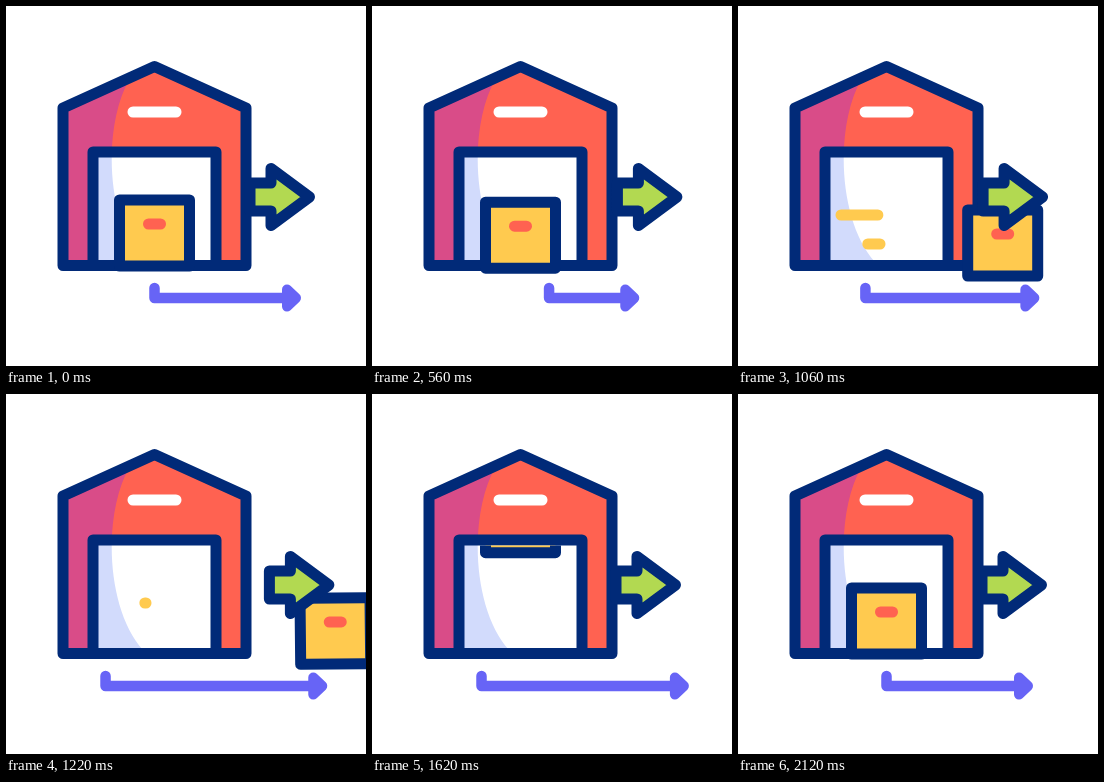
These frames come from a looping animation (360 px wide and 360 px high, 2.66 s). An HTML page with a canvas:

```html
<!DOCTYPE html>
<html lang="en">
<head>
<meta charset="utf-8">
<title>Shipping out</title>
<style>
html, body { margin: 0; width: 100%; height: 100%; overflow: hidden; background: #fff; }
canvas { display: block; width: 100vmin; height: 100vmin; }
</style>
</head>
<body>
<canvas id="stage" width="360" height="360"></canvas>
<script>
const LOOP = 2660;
const NAVY = '#012a78', RED = '#ff6251', PINK = '#d94c88', LAVENDER = '#d2dbfc';
const YELLOW = '#ffca4f', GREEN = '#b2d951', VIOLET = '#6764f6';
const c = document.getElementById('stage').getContext('2d');

const ramp = (t, a, b) => Math.min(1, Math.max(0, (t - a) / (b - a)));
const smooth = (t, a, b) => { const u = ramp(t, a, b); return u * u * (3 - 2 * u); };

function shape(points, fill, stroke, width = 11, closed = true) {
  const path = new Path2D();
  points.forEach(([x, y]) => path.lineTo(x, y));
  if (closed) path.closePath();
  if (fill) { c.fillStyle = fill; c.fill(path); }
  if (stroke) { c.strokeStyle = stroke; c.lineWidth = width; c.stroke(path); }
  return path;
}

const line = (points, color, width) => shape(points, null, color, width, false);

// A stroke that grows from its start, then is erased from its start.
function dash(x1, y1, x2, y2, head, tail) {
  if (head <= tail) return;
  const at = u => [x1 + (x2 - x1) * u, y1 + (y2 - y1) * u];
  line([at(tail), at(head)], YELLOW, 11);
}

function shade(path, color) {
  c.save();
  c.clip(path);
  c.beginPath();
  c.moveTo(40, 50);
  c.lineTo(133, 50);
  c.lineTo(124, 72);
  c.bezierCurveTo(96, 120, 100, 215, 137, 256);
  c.lineTo(40, 270);
  c.fillStyle = color;
  c.fill();
  c.restore();
}

function warehouse() {
  const wall = [[57, 259.5], [57, 102], [148.5, 60.5], [240, 102], [240, 259.5]];
  const door = [[87, 259.5], [87, 146], [210, 146], [210, 259.5]];
  shade(shape(wall, RED), PINK);
  shade(shape(door, '#fff'), LAVENDER);
  shape(door, null, NAVY);
  shape(wall, null, NAVY);
  line([[127, 106], [170, 106]], '#fff');
}

function crate(t) {
  let x = 0, y = 0, tilt = 0;
  const falling = t > 1560 && t < 1700;
  if (t < 1500) {
    const u = Math.max(0, t - 685);
    x = u < 175 ? 0.4 * u * u / 350 : 35 + 0.404 * (u - 175);
    y = 10 * smooth(t, 510, 680);
    tilt = -0.1 * ramp(t, 1200, 1400);
  } else if (t <= 1560) {
    return;
  } else if (falling) {
    y = -125 * (1 - ramp(t, 1560, 1700) ** 2);
  } else {
    y = -10 * Math.sin(Math.PI * ramp(t, 1700, 1900));
  }
  c.save();
  if (falling) {
    c.beginPath();
    c.rect(92, 151.5, 113, 114);
    c.clip();
  }
  c.translate(148.5 + x, 227 + y);
  c.rotate(tilt);
  shape([[-35, -33], [35, -33], [35, 33], [-35, 33]], YELLOW, NAVY);
  line([[-6, -9], [6, -9]], RED);
  c.restore();
}

function speedLines(t) {
  const grow = 1 - (1 - ramp(t, 780, 1080)) ** 2;
  dash(103, 209, 140, 209, grow, smooth(t, 1060, 1240));
  dash(83, 238, 142, 238, smooth(t, 720, 920), smooth(t, 870, 1140));
}

function sparks(t) {
  const head = ramp(t, 1700, 1840), tail = ramp(t, 1780, 1920);
  dash(127, 261, 121, 267, head, tail);
  dash(151, 258.5, 154, 283, head, tail);
  dash(176, 258, 181, 265, head, tail);
}

function greenArrow(t) {
  const x = 22 * Math.sin(2 * Math.PI * ramp(t, 520, 1530)) ** 2;
  const points = [[244, 177], [265, 177], [265, 162.5], [303.5, 191],
                  [265, 219.5], [265, 205], [244, 205]];
  shape(points.map(([px, py]) => [px + x, py]), GREEN, NAVY);
}

function baseArrow(t) {
  const shrink = smooth(t, 180, 690), stretch = smooth(t, 690, 1340), rest = smooth(t, 1340, 2090);
  const left = 148.5 + 34 * shrink - 91 * stretch + 57 * rest;
  const right = 290 - 33 * shrink + 65 * stretch - 32 * rest;
  line([[left, 282], [left, 292], [right - 5, 292]], VIOLET, 10.5);
  shape([[right - 9, 283.5], [right, 292], [right - 9, 300.5]], VIOLET, VIOLET, 10);
}

function draw(now) {
  const t = now % LOOP;
  c.fillStyle = '#fff';
  c.fillRect(0, 0, 360, 360);
  c.lineJoin = c.lineCap = 'round';
  warehouse();
  speedLines(t);
  crate(t);
  greenArrow(t);
  baseArrow(t);
  sparks(t);
}

const start = performance.now();
function tick() {
  draw(performance.now() - start);
  requestAnimationFrame(tick);
}
tick();
</script>
</body>
</html>
```
